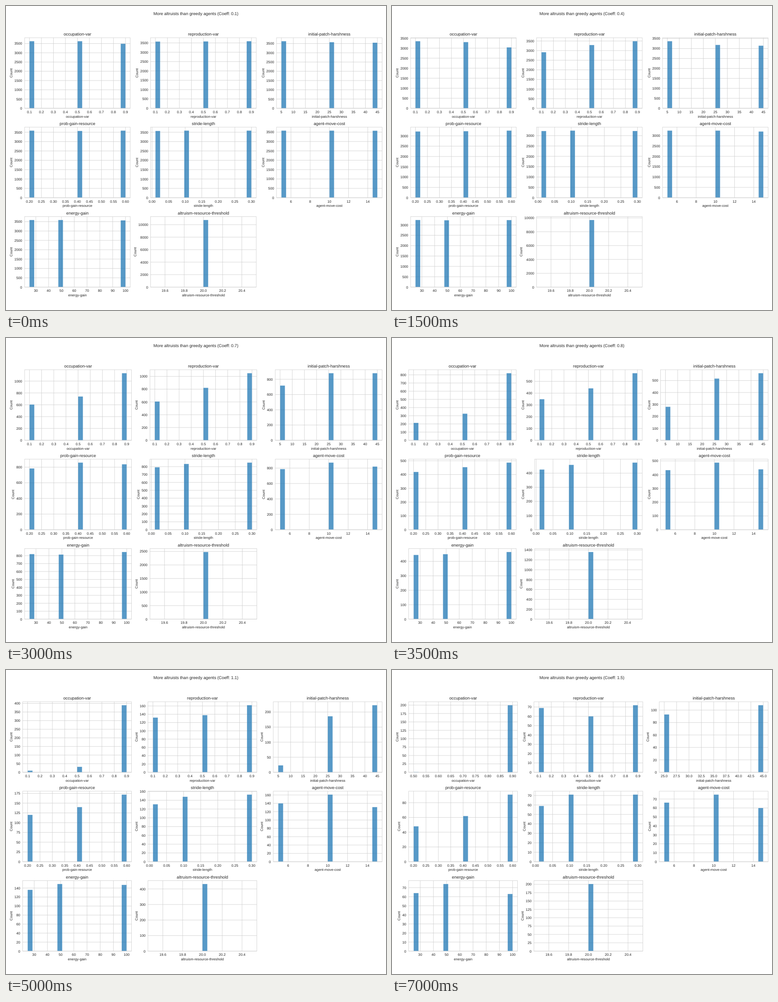
Write an HTML page with a canvas that moves like this. It is 837 px wide and 669 px high and loops after 7500 ms.

```html
<!DOCTYPE html>
<html lang="en">
<head>
<meta charset="utf-8">
<title>More altruists than greedy agents</title>
<style>
  html, body { margin: 0; width: 100%; height: 100%; overflow: hidden; background: #fff; }
  canvas { display: block; }
</style>
</head>
<body>
<canvas id="stage" width="837" height="669"></canvas>
<script>
const ctx = document.getElementById('stage').getContext('2d');
const STEP_MS = 500, BINS = 20, RIGHT = 828.6, HEIGHT = 155.2;
const LINE = 0.775, DIGIT = 4.31, TICK_PAD = 5.4, SMALL = 7.75, LARGE = 9.3;
const INK = '#262626', GRID = '#ccc';

// Number of runs at each coefficient, 0.1 to 1.5.
const totals = [10750, 10640, 10450, 9700, 7240, 4500, 2480, 1360, 758, 565, 432, 320, 239, 216, 201];

// Counts of the first two values at these steps; the third is the remainder.
const keySteps = [0, 2, 4, 6, 8, 12, 14];
const plots = [
  { name: 'occupation-var', values: [0.1, 0.5, 0.9],
    counts: [[3630, 3630], [3615, 3575], [2500, 2460], [605, 740], [67, 142], [0, 3], [0, 1]] },
  { name: 'reproduction-var', values: [0.1, 0.5, 0.9],
    counts: [[3575, 3580], [3425, 3495], [1990, 2490], [607, 822], [204, 240], [82, 77], [69, 60]] },
  { name: 'initial-patch-harshness', values: [5, 25, 45],
    counts: [[3630, 3575], [3605, 3445], [2535, 2365], [718, 881], [104, 308], [2, 109], [0, 93]] },
  { name: 'prob-gain-resource', values: [0.2, 0.4, 0.6],
    counts: [[3590, 3570], [3490, 3465], [2380, 2420], [784, 859], [227, 244], [61, 78], [48, 62]] },
  { name: 'stride-length', values: [0.01, 0.1, 0.3],
    counts: [[3570, 3590], [3465, 3495], [2415, 2425], [793, 835], [232, 256], [72, 83], [59, 71]] },
  { name: 'agent-move-cost', values: [5, 10, 15],
    counts: [[3585, 3585], [3490, 3490], [2430, 2430], [788, 872], [242, 277], [79, 91], [66, 75]] },
  { name: 'energy-gain', values: [25, 50, 100],
    counts: [[3590, 3590], [3490, 3490], [2415, 2400], [820, 814], [245, 253], [73, 85], [64, 74]] },
  { name: 'altruism-resource-threshold', values: [20] }
];

function countsAt(plot, step) {
  const total = totals[step];
  if (!plot.counts) return [total];
  const next = Math.max(1, keySteps.findIndex(k => k >= step));
  const from = keySteps[next - 1], to = keySteps[next];
  const t = (step - from) / (to - from);
  const [a, b] = [0, 1].map(i => {
    const root = (k, s) => Math.sqrt(plot.counts[k][i] / totals[s]);
    const mixed = root(next - 1, from) * (1 - t) + root(next, to) * t;
    return Math.round(mixed * mixed * total);
  });
  return [a, b, total - a - b];
}

// Round tick values with at most nine intervals.
function ticks(lo, hi) {
  const least = (hi - lo) / 9, unit = 10 ** Math.floor(Math.log10(least));
  const size = +([1, 2, 2.5, 5, 10].find(m => m * unit >= least) * unit).toPrecision(3);
  const decimals = (String(size).split('.')[1] || '').length;
  const list = [];
  for (let k = Math.ceil(lo / size); k <= Math.floor(hi / size); k++) {
    list.push({ value: k * size, label: (k * size).toFixed(decimals) });
  }
  return list;
}

function histogram(plot, step) {
  const bars = countsAt(plot, step)
    .map((count, i) => ({ count, value: plot.values[i] }))
    .filter(bar => bar.count > 0);
  let lo = bars[0].value, hi = bars[bars.length - 1].value;
  if (lo === hi) { lo -= 0.5; hi += 0.5; }
  for (const bar of bars) {
    bar.bin = Math.min(BINS - 1, Math.floor((bar.value - lo) / (hi - lo) * BINS + 1e-9));
  }
  const margin = (hi - lo) * 0.05;
  const top = Math.max(...bars.map(bar => bar.count)) * 1.05;
  const yTicks = ticks(0, top);
  return {
    name: plot.name, bars, top, yTicks,
    lo: lo - margin, hi: hi + margin,
    xTicks: ticks(lo - margin, hi + margin),
    digits: yTicks[yTicks.length - 1].label.length
  };
}

function text(str, x, y, size, align = 'center') {
  ctx.font = `${size}px "Liberation Sans", Arial, sans-serif`;
  ctx.textAlign = align;
  ctx.fillStyle = INK;
  ctx.fillText(str, x, y);
}

function line(x1, y1, x2, y2) {
  ctx.beginPath();
  ctx.moveTo(x1, y1);
  ctx.lineTo(x2, y2);
  ctx.stroke();
}

function drawPlot(chart, x, y, width) {
  const bottom = y + HEIGHT, middle = x + width / 2;
  ctx.strokeStyle = GRID;
  ctx.lineWidth = LINE;
  for (const { value, label } of chart.xTicks) {
    const tx = x + (value - chart.lo) / (chart.hi - chart.lo) * width;
    line(tx, y, tx, bottom);
    text(label, tx, bottom + 10.7, SMALL);
  }
  for (const { value, label } of chart.yTicks) {
    const ty = bottom - value / chart.top * HEIGHT;
    line(x, ty, x + width, ty);
    text(label, x - TICK_PAD, ty + 2.8, SMALL, 'right');
  }

  const binWidth = width / 1.1 / BINS;
  ctx.globalAlpha = 0.75;
  for (const { bin, count } of chart.bars) {
    const height = count / chart.top * HEIGHT;
    const box = [x + width / 22 + bin * binWidth, bottom - height, binWidth, height];
    ctx.fillStyle = '#1f77b4';
    ctx.fillRect(...box);
    ctx.strokeStyle = '#fff';
    ctx.lineWidth = 0.4;
    ctx.strokeRect(...box);
  }
  ctx.globalAlpha = 1;

  ctx.strokeStyle = GRID;
  ctx.lineWidth = LINE;
  ctx.strokeRect(x, y, width, HEIGHT);
  text(chart.name, middle, y - 4.6, LARGE);
  text(chart.name, middle, bottom + 20.4, SMALL);

  ctx.save();
  ctx.translate(x - TICK_PAD - chart.digits * DIGIT - 4.7, y + HEIGHT / 2);
  ctx.rotate(-Math.PI / 2);
  text('Count', 0, 0, SMALL);
  ctx.restore();
}

function draw(step) {
  ctx.fillStyle = '#fff';
  ctx.fillRect(0, 0, 837, 669);
  text(`More altruists than greedy agents (Coeff: ${((step + 1) / 10).toFixed(1)})`, 418.3, 20.1, LARGE);

  // The widest tick labels set the left margin and the column gap.
  const charts = plots.map(plot => histogram(plot, step));
  const widest = test => Math.max(...charts.filter((_, i) => test(i % 3)).map(c => c.digits));
  const left = 23.8 + DIGIT * widest(col => col === 0);
  const gap = 23.2 + DIGIT * widest(col => col > 0);
  const width = (RIGHT - left - 2 * gap) / 3;
  charts.forEach((chart, i) => {
    drawPlot(chart, left + (i % 3) * (width + gap), 69.9 + Math.floor(i / 3) * 196.8, width);
  });
}

let shown = -1;
function tick() {
  const step = Math.floor(performance.now() / STEP_MS) % totals.length;
  if (step !== shown) draw(shown = step);
  requestAnimationFrame(tick);
}
ctx.textRendering = 'geometricPrecision';
tick();
</script>
</body>
</html>
```
